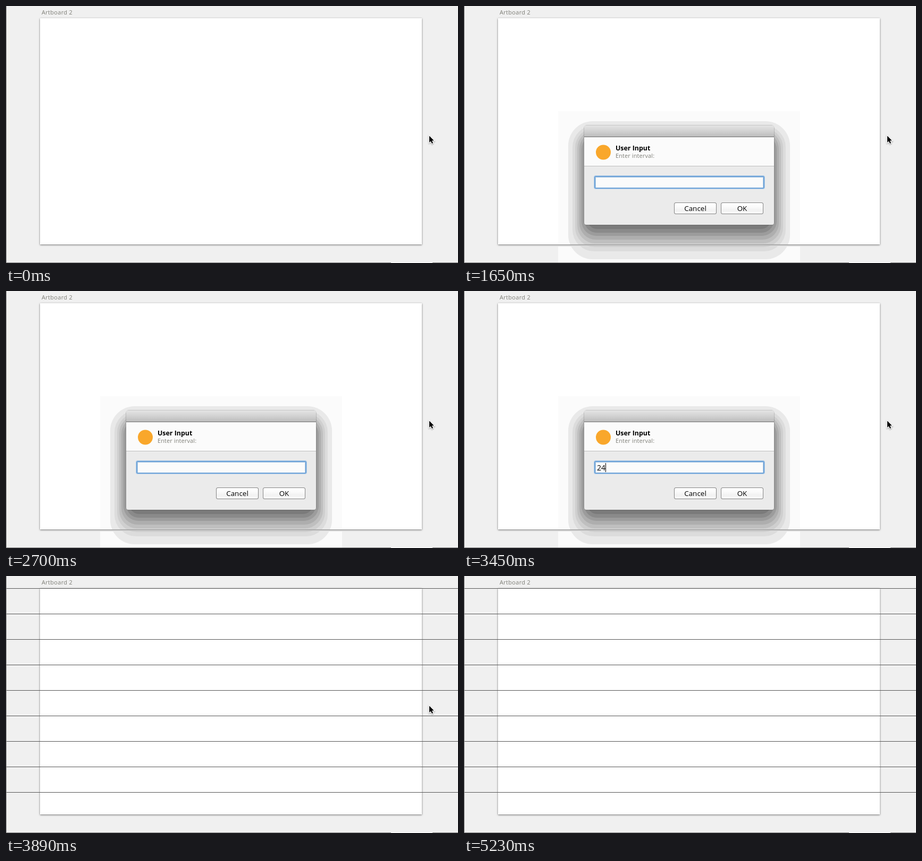
An HTML page with a canvas that plays this animation: 850 px wide and 484 px high, repeating every 5.87 s.

```html
<!DOCTYPE html>
<html lang="en">
<head>
<meta charset="utf-8">
<title>Guides at an interval</title>
<style>
  html, body { margin: 0; width: 100%; height: 100%; overflow: hidden; background: #f0f0f0; }
  canvas, svg { position: absolute; left: 0; top: 0; width: 850px; height: 484px; }
  text { font: 11px "Open Sans", "Noto Sans", sans-serif; fill: #7f7f78; letter-spacing: .1px; }
  .label { letter-spacing: .3px; }
  .title { font-size: 12.4px; font-weight: 700; fill: #000; letter-spacing: 0; }
  .button { font-size: 13.3px; fill: #000; text-anchor: middle; }
  .value { font-size: 14px; fill: #000; letter-spacing: 0; }
</style>
</head>
<body>
<canvas id="stage" width="850" height="484"></canvas>
<svg viewBox="0 0 850 484">
  <text class="label" x="67" y="16">Artboard 2</text>
  <g id="dialog" visibility="hidden">
    <text class="title" x="285" y="272">User Input</text>
    <text x="285" y="286">Enter interval:</text>
    <text class="button" x="435" y="386">Cancel</text>
    <text class="button" x="523" y="386">OK</text>
    <text class="value" id="value" x="250" y="338"></text>
  </g>
</svg>
<script>
const LOOP = 5870;
const ctx = document.getElementById('stage').getContext('2d');
const dialogText = document.getElementById('dialog');
const valueText = document.getElementById('value');

// Shadow steps: left, top, bottom, radius, grey
const SHADOW = [
  [196, 217, 477, 46, 233],
  [204, 225, 462, 41, 220],
  [209, 230, 454, 37, 207],
  [213, 234, 447, 34, 191],
  [217, 238, 440, 31, 174],
  [221, 242, 433, 28, 156],
  [226, 246, 427, 24, 138],
  [231, 250, 420, 20, 122]
];

function fillRect(x, y, w, h, color) {
  ctx.fillStyle = color;
  ctx.fillRect(x, y, w, h);
}

function roundRect(x, y, w, h, r, color) {
  ctx.beginPath();
  ctx.roundRect(x, y, w, h, r);
  ctx.fillStyle = color;
  ctx.fill();
}

function gradient(y0, y1, ...colors) {
  const g = ctx.createLinearGradient(0, y0, 0, y1);
  colors.forEach((c, i) => g.addColorStop(i / (colors.length - 1), c));
  return g;
}

function drawPage() {
  fillRect(0, 0, 850, 484, '#f0f0f0');
  ctx.save();
  ctx.shadowColor = 'rgba(0,0,0,.55)';
  ctx.shadowBlur = 3;
  ctx.shadowOffsetY = 1;
  fillRect(64, 23, 718, 426, '#fff');
  ctx.restore();
  fillRect(0, 0, 1, 484, '#808080');
  fillRect(0, 483, 850, 1, '#808080');
  fillRect(724, 483, 78, 1, '#fff');
}

function drawGuides() {
  for (let y = 23; y < 449; y += 48) fillRect(1, y, 849, 1, '#555');
}

// Darkening keeps the edge of the page visible through the shadow
function drawShadow() {
  fillRect(177, 453, 455, 30, '#fbfbfb');
  ctx.save();
  ctx.globalCompositeOperation = 'darken';
  fillRect(177, 198, 455, 255, '#fbfbfb');
  for (const [x, top, bottom, r, grey] of SHADOW) {
    roundRect(x, top, 809 - 2 * x, bottom - top, r, `rgb(${grey},${grey},${grey})`);
  }
  ctx.restore();
}

function drawButton(x) {
  roundRect(x, 370, 80, 22, 3.5, '#858585');
  roundRect(x + 1, 371, 78, 20, 2.5, gradient(371, 391, '#fff', '#fbfbfb', '#f2f2f2', '#f8f8f8'));
}

function drawField() {
  roundRect(244, 319, 322, 26, 4, '#b3cee9');
  roundRect(245, 320, 320, 24, 3, '#70a4d8');
  roundRect(247, 322, 316, 20, 0, '#a9c6e2');
  fillRect(248, 323, 314, 19, '#fbfbfb');
}

function drawDialog(caret) {
  drawShadow();
  roundRect(225.5, 224.5, 358, 188, 5, 'rgba(0,0,0,.3)');
  ctx.save();
  ctx.beginPath();
  ctx.roundRect(226, 225, 357, 187, 4);
  ctx.clip();
  fillRect(226, 225, 357, 187, '#ebebeb');
  fillRect(226, 225, 357, 21, gradient(225, 246, '#e4e4e4', '#d2d2d2', '#bcbcbc'));
  fillRect(226, 246, 357, 1, '#6e6e6e');
  fillRect(226, 247, 357, 54, '#fbfbfb');
  fillRect(226, 301, 357, 1, '#bdbdbd');
  ctx.restore();

  ctx.beginPath();
  ctx.arc(262, 275.5, 14, 0, 2 * Math.PI);
  ctx.fillStyle = '#f9a72b';
  ctx.fill();

  drawField();
  drawButton(395);
  drawButton(483);
  if (caret) fillRect(caret, 324, 1, 17, '#000');
}

function drawCursor(x, y) {
  ctx.save();
  ctx.translate(x, y);
  ctx.beginPath();
  ctx.moveTo(0, 0);
  for (const [px, py] of [[0, 12.5], [2.9, 9.9], [4.9, 14.6], [7, 13.7], [5, 9.1], [8.8, 9.1]]) {
    ctx.lineTo(px, py);
  }
  ctx.closePath();
  ctx.shadowColor = 'rgba(0,0,0,.4)';
  ctx.shadowBlur = 2;
  ctx.shadowOffsetY = 1;
  ctx.lineWidth = 2.4;
  ctx.strokeStyle = '#fff';
  ctx.stroke();
  ctx.shadowColor = 'transparent';
  ctx.fillStyle = '#000';
  ctx.fill();
  ctx.restore();
}

function caretAt(t) {
  if (t >= 3450) return 266;
  if (t >= 3000) return 258;
  const blinkedOff = (t >= 1650 && t < 2100) || t >= 2700;
  return blinkedOff ? 0 : 250;
}

function draw(t) {
  const open = t >= 1050 && t < 3740;
  drawPage();
  if (t >= 3890) drawGuides();
  if (open) drawDialog(caretAt(t));
  dialogText.setAttribute('visibility', open ? 'visible' : 'hidden');
  valueText.textContent = t < 3000 ? '' : t < 3450 ? '2' : '24';
  if (t < 5080) drawCursor(796, 244.5);
  else if (t < 5230) drawCursor(780, 265.5);
}

const start = performance.now();
function tick() {
  draw((performance.now() - start) % LOOP);
  requestAnimationFrame(tick);
}
tick();
</script>
</body>
</html>
```
